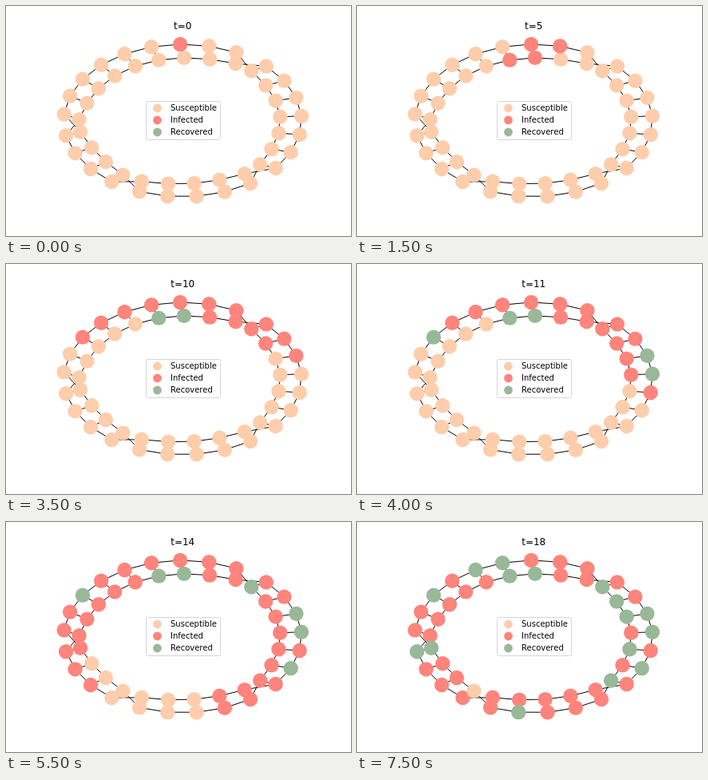
An HTML page that plays this animation: 432x288 px, repeating every 8 s.

```html
<!DOCTYPE html>
<html lang="en">
<head>
<meta charset="utf-8">
<title>Epidemic on a ring network</title>
<style>
  html, body { margin: 0; width: 100%; height: 100%; overflow: hidden; background: #fff; }
  svg { display: block; }
  text { font: 10px "DejaVu Sans", sans-serif; }
  #title { font-size: 12px; text-anchor: middle; }
  .susceptible { fill: #fecdab; }
  .infected { fill: #ff847c; }
  .recovered { fill: #99b898; }
</style>
</head>
<body>
<svg width="432" height="288" viewBox="0 0 432 288">
  <path id="edges" fill="none" stroke="#000"/>
  <g id="nodes"></g>
  <rect x="175.5" y="119.5" width="93" height="48" rx="2" fill="#fff" stroke="#d6d6d6"/>
  <g id="legend"></g>
  <text id="title" x="221.2" y="29">t=0</text>
</svg>
<script>
const STEP = 500, STEPS = 16, SIZE = 25;
const CENTER = { x: 221.2, y: 143.4 }, RADIUS = { x: 149, y: 95.5 };
const NS = "http://www.w3.org/2000/svg";
const $ = id => document.getElementById(id);

// The two strands A and B swap sides between these arcs (angles clockwise from the top).
const arcs = [
  { first: 19, count: 9, mid: 330.8, outer: "A" },
  { first: 3, count: 7, mid: 86.6, outer: "B" },
  { first: 10, count: 5, mid: 173.3, outer: "A" },
  { first: 15, count: 4, mid: 237.6, outer: "B" }
];

// How far the infection has run along each strand: [step, nodes from the top].
const fronts = {
  A: {
    right: [[0, 0], [3, 1], [5, 1], [8, 6], [11, 11], [14, 14]],
    left: [[3, 0], [5, 2], [7, 4], [9, 4], [11, 7], [15, 9]]
  },
  B: {
    right: [[0, -1], [1, 0], [3, 0], [5, 4], [7, 5], [8, 7], [11, 11], [14, 14]],
    left: [[1, 0], [2, 1], [8, 1], [11, 9], [13, 9], [15, 10]]
  }
};

const recoveries = {
  5: "B24", 7: "B0", 8: "A21 B5 B6", 10: "A3", 11: "B8", 12: "A23",
  13: "A4 A9 A18 A24 B18", 14: "A5", 15: "A7 A13"
};

function add(parent, name, attrs, text = "") {
  const el = document.createElementNS(NS, name);
  for (const key in attrs) el.setAttribute(key, attrs[key]);
  el.textContent = text;
  parent.append(el);
  return el;
}

function reach(keys, step) {
  const next = keys.findIndex(key => key[0] >= step);
  if (next < 0) return keys.at(-1)[1];
  if (next === 0) return keys[0][1];
  const [s0, n0] = keys[next - 1], [s1, n1] = keys[next];
  return n0 + (n1 - n0) * (step - s0) / (s1 - s0);
}

function place(arc, i, strand) {
  const last = arc.count - 1;
  const outside = strand === arc.outer;
  const angle = (arc.mid + (i - last / 2) * (outside ? 14 : 15)) * Math.PI / 180;
  // Inner arcs bulge outwards at their ends, towards the crossings.
  const scale = outside ? 1 : 0.815 + 0.055 * (Math.exp(-i) + Math.exp(i - last));
  return {
    x: CENTER.x + RADIUS.x * scale * Math.sin(angle),
    y: CENTER.y - RADIUS.y * scale * Math.cos(angle)
  };
}

function buildStrand(name) {
  const strand = [];
  for (const arc of arcs) {
    for (let i = 0; i < arc.count; i++) {
      const k = (arc.first + i) % SIZE;
      const right = k < 15;
      strand[k] = {
        ...place(arc, i, name),
        name: name + k,
        front: fronts[name][right ? "right" : "left"],
        distance: right ? k : SIZE - k
      };
    }
  }
  for (const n of strand) n.el = add($("nodes"), "circle", { cx: n.x, cy: n.y, r: 9.2 });
  return strand;
}

const b = buildStrand("B"), a = buildStrand("A");
const nodes = [...a, ...b];

const line = points => "M" + points.map(p => `${p.x},${p.y}`).join("L");
const rungs = a.map((p, k) => line([p, b[k]])).join("");
$("edges").setAttribute("d", line(a) + "Z" + line(b) + "Z" + rungs);

const recoveredAt = {};
for (const step in recoveries)
  for (const name of recoveries[step].split(" ")) recoveredAt[name] = +step;

["Susceptible", "Infected", "Recovered"].forEach((label, k) => {
  const y = 128 + k * 15;
  add($("legend"), "circle", { cx: 189.5, cy: y, r: 5.4, class: label.toLowerCase() });
  add($("legend"), "text", { x: 206, y: y + 3 }, label);
});

function stateOf(node, step) {
  if (step >= recoveredAt[node.name]) return "recovered";
  return reach(node.front, step) >= node.distance ? "infected" : "susceptible";
}

let shown = -1;
function draw(now) {
  const step = Math.floor(now / STEP) % STEPS;
  if (step !== shown) {
    shown = step;
    for (const n of nodes) n.el.setAttribute("class", stateOf(n, step));
    $("title").textContent = "t=" + Math.min(step + 3, Math.round(1.6 * step));
  }
  requestAnimationFrame(draw);
}
draw(performance.now());
</script>
</body>
</html>
```
